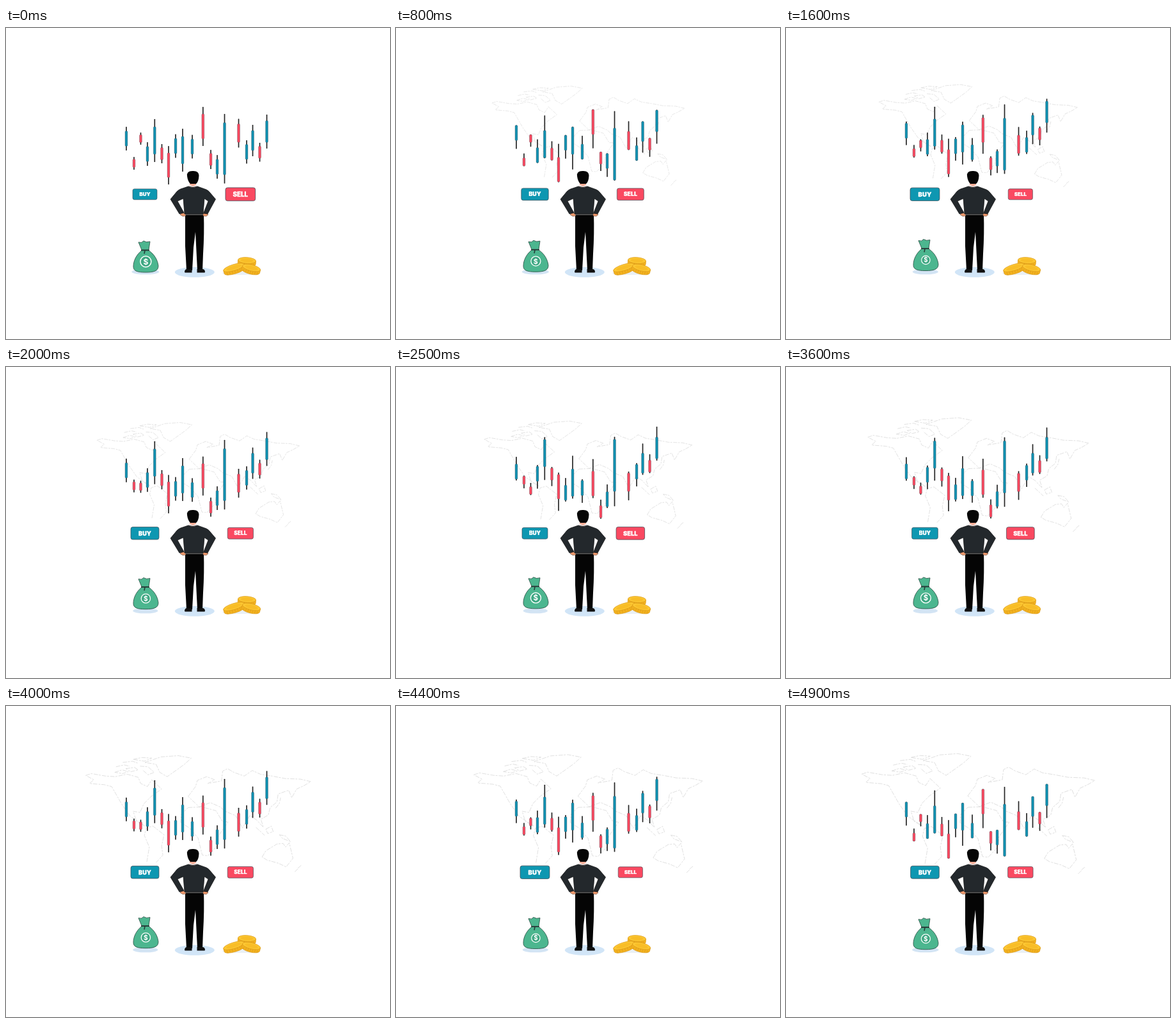
These frames come from a looping animation (600x485 px, 5000 ms). An HTML page:

```html
<!DOCTYPE html>
<html lang="en">
<head>
<meta charset="utf-8">
<title>Trading</title>
<style>
  html, body { margin: 0; width: 100%; height: 100%; overflow: hidden; background: #fff; }
  svg { display: block; width: 100vw; height: 100vh; }
  text { font: 900 9px Inter, "Open Sans", sans-serif; fill: #fff; text-anchor: middle; }
  .btn rect { stroke: #3d4a55; stroke-width: .7; }
  .btn text { stroke: #fff; stroke-width: .25; }
  #map { fill: none; stroke: #dcdcdc; stroke-dasharray: 7 1.5 3 2; }
  .coin { stroke: #dc9a18; stroke-width: .7; }
</style>
</head>
<body>
<svg viewBox="0 0 600 485">
  <g id="map" stroke-width=".9">
    <path d="M118 106L127 103L150 107L166 108L185 104L203 109L207 119L218 124L225 113L241 128L224 140L212 152L206 166L195 164L200 180L214 188L190 172L176 152L168 138L160 124L148 121L124 119L131 113Z"/>
    <path d="M214 85L240 76L268 74L289 78L278 88L267 96L250 108L238 101L232 88Z"/>
    <path d="M165 101l12-4 10 3-9 3zM167 92l13-3 9 2M183 95l14-2 6 4-12 3zM178 85l16-2 8 3M195 80l14-3 16 1-12 5zM206 91l13 1 10 9-10 4-9-8"/>
    <path d="M217 246L221 222L213 203L216 191L227 188L245 202L241 220L243 235L232 247"/>
    <path d="M284 140L296 124L299 114L314 108L327 113L316 119L338 115L340 99L348 95L358 101L375 107L388 98L401 104L420 107L441 111L466 112L483 116L471 123L460 128L452 142L447 130L430 136L428 149L417 158L414 170L402 177L406 190L395 178L384 171L372 191L361 171L344 164L336 157L320 150L302 157Z"/>
    <path d="M284 158L306 157L329 163L340 181L349 181L333 204L331 220L316 236L307 235L300 207L286 191L272 182L273 169Z"/>
    <path d="M404 238L410 228L428 217L438 216L442 222L448 215L454 240L443 254L430 248L412 243Z"/>
    <path d="M394 190l14 13M410 193l9-5 3 9-9 3zM432 202l10 2 8 9-13-5zM457 262l5-5M462 256l6-5M426 159l6-8 2-9"/>
  </g>

  <g id="candles"></g>

  <g class="btn" id="buy"><rect x="-21.5" y="-9.5" width="43" height="19" rx="3" fill="#0e97b1"/><text y="3.2">BUY</text></g>
  <g class="btn" id="sell"><rect x="-21.5" y="-9.5" width="43" height="19" rx="3" fill="#fa4961"/><text y="3.2">SELL</text></g>

  <ellipse id="shade" cx="217.8" cy="380.3" ry="4" fill="#d3e4f4"/>
  <g id="bag">
    <path d="M212 347C203 354 199 364 199 372C199 379 205 381 218 381S238 379 238 371C237 362 232 353 223 347Z" fill="#4cb68f" stroke="#30594c" stroke-width=".9"/>
    <path d="M212 346L207 334Q212 336 215 332Q219 335 225 333L223 346Z" fill="#4cb68f" stroke="#30594c" stroke-width=".9"/>
    <path d="M211 346.5h13M217 347l-1 5" stroke="#263c38" stroke-width="1.6"/>
    <g id="dollar">
      <circle r="8" fill="#3fa883" stroke="#fff" stroke-width="1.4"/>
      <text y="4.2" style="font-size:11.5px;font-weight:700">$</text>
    </g>
  </g>

  <ellipse cx="294.8" cy="380.8" rx="31" ry="8" fill="#d1e5f7"/>
  <g id="man">
    <path d="M280 290H309Q310 320 308 352L307 378H299L296 318L293 342L291 378H282L280 340Z" fill="#050505"/>
    <path d="M279 381Q279 376 283 376H290.500V381.500H280ZM311 381Q311 376 307 376H298.500V381.500H310Z" fill="#111"/>
    <path d="M272 291Q275 287 280 289.500L281 293L276 293.500ZM316 291Q312 287 308 289.500L308 293L313 293.500Z" fill="#f29a6c" stroke="#41302b" stroke-width=".5"/>
    <path d="M287 238H297V248H287Z" fill="#f4b09a"/>
    <path d="M286 244L292 247L298 244L299 249H285Z" fill="#f7eeee"/>
    <path d="M285 247Q292 250 299 247L313 252Q317 254 319 257L327.500 267L315 290L308.500 289L316 270L310 266L308 290H279L277 266L268 270L278 288L271 290L257 267L267 255Q270 252 273 251Z" fill="#23282c" stroke="#111" stroke-width=".7"/>
    <path d="M280 291H308" stroke="#c9c9c9" stroke-width=".7"/>
    <path d="M283 231Q282 223 291 223Q301 222 301.500 230Q301 240 297 243H288Q284 239 283 231Z" fill="#060606"/>
  </g>

  <ellipse cx="367" cy="382.500" rx="29" ry="2.500" fill="#eaf0f5"/>
  <g id="coins"></g>
</svg>
<script>
const NS = 'http://www.w3.org/2000/svg';
const $ = id => document.getElementById(id);
const set = (el, attrs) => { for (const k in attrs) el.setAttribute(k, attrs[k]); };
const add = (parent, tag, attrs) => {
  const el = parent.appendChild(document.createElementNS(NS, tag));
  set(el, attrs);
  return el;
};

// x, top, rise, length, colour, side the body slides to first, body share
const B = '#0d91b1', R = '#fa485f';
const candles = [
  [188, 154, 15, 37, B, -1], [200, 201, 34, 20, R, 1], [210.5, 163, -19, 19, R, -1],
  [221, 178, 27, 37, B, 1], [232.3, 142, 35, 67, B, 1], [243.5, 181, 27, 30, R, 1],
  [254, 184, 21, 60, R, 1], [265, 165.5, -8, 37, B, -1], [276, 157, 20, 67, B, -1],
  [291, 166.5, -9, 37, B, 1], [307.8, 123, -22, 61, R, -1], [320, 190, -18, 30, R, -1],
  [330, 198, 16, 37, B, -1], [341.5, 134, 27, 108.5, B, 1, .75], [363.5, 141.5, -23, 45, R, 1],
  [376, 175, 27, 36.5, B, 1], [385.5, 151, 34, 49, B, -1], [396.5, 179, 46, 29.5, R, -1],
  [407.5, 135, 45, 53, B, -1]
].map(([x, top, rise, len, fill, dir, share = .64]) => {
  const g = add($('candles'), 'g', {});
  add(g, 'rect', { x: x - .85, width: 1.7, height: len, rx: .6, fill: '#262626' });
  const body = add(g, 'rect', { x: x - 1.9, width: 3.8, height: len * share, rx: 1.4,
    fill, stroke: '#3a3f48', 'stroke-width': .35 });
  return { g, body, top, rise, dir, slack: len * (1 - share) };
});

function coin(x, y, rx, angle) {
  const g = add($('coins'), 'g', { class: 'coin', transform: `translate(${x} ${y}) rotate(${angle})` });
  add(g, 'path', { d: `M${-rx} 0v5a${rx} 5 0 0 0 ${2 * rx} 0v-5z`, fill: '#f3b21f' });
  for (let i = -3; i <= 3; i++) add(g, 'path', { d: `M${i * rx / 4} 4.5v4` });
  add(g, 'ellipse', { rx, ry: 4.8, fill: '#fcc733' });
  add(g, 'ellipse', { rx: rx * .72, ry: 3, fill: '#f8bd27', stroke: 'none' });
}
coin(376.5, 362.5, 14, 4);
coin(356, 373.5, 17, -17);
coin(383.5, 374, 14.5, 14);

const halfWidths = [149, 150, 152.5, 157, 162, 167.5, 173, 178, 182, 185];
const wave = (t, period) => Math.cos(2 * Math.PI * t / period);

function draw(t) {
  const i = Math.floor(t / 600), f = t / 600 - i;
  const s = (halfWidths[i] + (halfWidths[i + 1] - halfWidths[i]) * f) / 183;
  set($('map'), {
    transform: `translate(300 168.5) scale(${s}) translate(-300 -168.5)`,
    opacity: Math.min(1, t / 900)
  });

  const lift = (1 - wave(t, 6000)) / 2;
  const slide = Math.sin(2 * Math.PI * t / 4000);
  for (const c of candles) {
    set(c.g, { transform: `translate(0 ${c.top - c.rise * lift})` });
    set(c.body, { y: c.slack * (1 + c.dir * slide) / 2 });
  }

  const pulse = wave(t, 3000);
  set($('buy'), { transform: `translate(217 259.3) scale(${(42 - 4 * pulse) / 43})` });
  set($('sell'), { transform: `translate(366.3 259.3) scale(${(42.4 + 4.3 * pulse) / 43})` });
  set($('bag'), { transform: `translate(0 ${-4.5 * lift})` });
  set($('dollar'), { transform: `translate(218.4 364.3) scale(${.95 + .11 * pulse})` });
  set($('shade'), { rx: 21.5 - 2.5 * lift });
}

let start;
function tick(now) {
  start ??= now;
  draw(Math.floor((now - start) % 5000 / 100) * 100);
  requestAnimationFrame(tick);
}
draw(0);
requestAnimationFrame(tick);
</script>
</body>
</html>
```
